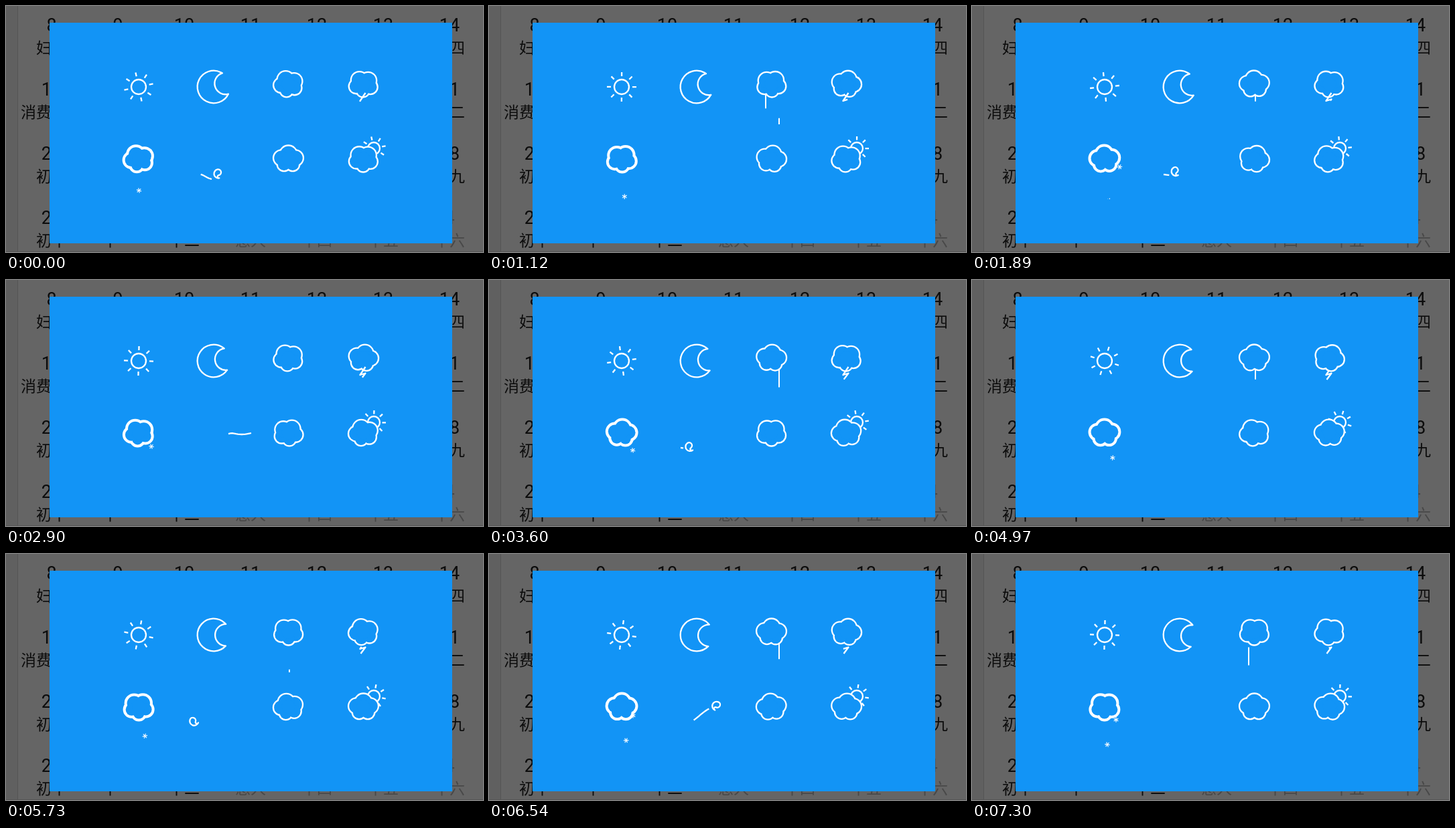
Animation, 712 px wide and 368 px high, one loop 7.35 s. Source, as an HTML page with a canvas:

```html
<!DOCTYPE html>
<html lang="zh">
<head>
<meta charset="utf-8">
<style>
html, body { margin: 0; width: 100%; height: 100%; overflow: hidden; background: #656565; }
canvas { display: block; }
</style>
</head>
<body>
<canvas id="stage" width="712" height="368"></canvas>
<script>
const ctx = document.getElementById('stage').getContext('2d');
const LOOP = 7350, TAU = Math.PI * 2, BLUE = '#1294f6', WHITE = '#fff', STROKE = 2.3;
const clamp = (v, lo = 0, hi = 1) => Math.min(hi, Math.max(lo, v));
const smooth = u => (u = clamp(u), u * u * (3 - 2 * u));
const rad = deg => deg * Math.PI / 180;

function line(points, width = STROKE) {
  ctx.lineWidth = width;
  ctx.beginPath();
  points.forEach(([x, y]) => ctx.lineTo(x, y));
  ctx.stroke();
}

function ring(x, y, r) {
  ctx.lineWidth = STROKE;
  ctx.beginPath();
  ctx.arc(x, y, r, 0, TAU);
  ctx.stroke();
}

function clipBelow(y, draw) {
  ctx.save();
  ctx.beginPath();
  ctx.rect(65, 25, 601, y - 25);
  ctx.clip();
  draw();
  ctx.restore();
}

function calendar() {
  ctx.fillStyle = '#656565';
  ctx.fillRect(0, 0, 712, 368);
  ctx.fillStyle = '#606060';
  ctx.fillRect(0, 0, 17, 368);
  ctx.fillStyle = '#555';
  ctx.fillRect(17, 0, 1, 368);
  ctx.fillRect(0, 367, 712, 1);
  ctx.textAlign = 'center';
  const rows = [
    ['妇女', '', '', '', '', '', '廿四'],
    ['消费者权', '', '', '', '', '', '初二'],
    ['初三', '', '', '', '', '', '初九'],
    ['初十', '十一', '十二', '愚人', '十四', '十五', '十六']
  ];
  rows.forEach((row, r) => row.forEach((label, c) => {
    const x = 68 + 99 * c, y = 96 * r, day = 8 + 7 * r + c;
    ctx.fillStyle = day > 31 ? '#484848' : '#0c0c0c';
    ctx.font = '27px Roboto, sans-serif';
    ctx.fillText(day > 31 ? day - 31 : day, x, y + 38);
    ctx.font = '23px "Noto Sans CJK SC", "Noto Sans CJK", sans-serif';
    ctx.fillText(label, x, y + 70.5);
  }));
  ctx.fillStyle = BLUE;
  ctx.fillRect(65, 25, 601, 330);
}

// Five overlapping puffs circling clockwise; one phase unit is a fifth of a turn.
function cloud(cx, cy, phase, width = STROKE) {
  const grow = (width - 2) / 2;
  const puffs = (color, inset) => {
    ctx.fillStyle = color;
    for (let i = 0; i < 5; i++) {
      const a = Math.PI + TAU * (phase + i) / 5, c = Math.cos(a);
      ctx.beginPath();
      ctx.arc(cx - 11 * Math.sin(a), cy + 8.5 * c + 1.5, 9.5 + 3 * (1 - c / 2) - inset, 0, TAU);
      ctx.fill();
    }
    ctx.beginPath();
    ctx.arc(cx, cy, 10, 0, TAU);
    ctx.fill();
  };
  puffs(WHITE, -grow);
  puffs(BLUE, width - grow);
}

function sun(x, y, r, inner, outer, deg) {
  ring(x, y, r);
  for (let i = 0; i < 8; i++) {
    const a = rad(deg + 45 * i), c = Math.cos(a), s = Math.sin(a);
    line([[x + c * inner, y + s * inner], [x + c * outer, y + s * outer]]);
  }
}

function moon(x, y, deg) {
  ctx.save();
  ctx.translate(x, y);
  ctx.rotate(rad(deg));
  ctx.lineWidth = STROKE;
  ctx.beginPath();
  ctx.arc(0, 0, 24.3, rad(42), rad(318));
  ctx.arc(18.4, 0, 16.3, rad(-91), rad(91), true);
  ctx.closePath();
  ctx.stroke();
  ctx.restore();
}

function rain(t) {
  clipBelow(177, () => {
    for (const [x, start] of [[433, 0.245], [413, 0.865], [423, 1.79]]) {
      const age = (t - start + 2.99) % 2.99;
      if (t < start || age > 1.05) continue;
      const head = 136 + 67 * age;
      line([[x, Math.max(120, head - 27)], [x, head]], 2);
    }
  });
}

// Draws the part of a polyline between two fractions of its length.
function trimmed(points, from, to) {
  const lens = points.slice(1).map((p, i) => Math.hypot(p[0] - points[i][0], p[1] - points[i][1]));
  const total = lens.reduce((a, b) => a + b);
  const part = [];
  let done = 0;
  lens.forEach((len, i) => {
    const a = clamp((from * total - done) / len), b = clamp((to * total - done) / len);
    const [p, q] = [points[i], points[i + 1]];
    if (b > a) for (const u of [a, b]) part.push([p[0] + (q[0] - p[0]) * u, p[1] + (q[1] - p[1]) * u]);
    done += len;
  });
  line(part);
}

function flake(x, y, angle) {
  for (let i = 0; i < 3; i++) {
    const a = angle + i * Math.PI / 3, c = 3.8 * Math.cos(a), s = 3.8 * Math.sin(a);
    line([[x - c, y - s], [x + c, y + s]], 1.3);
  }
}

function snow(t) {
  clipBelow(289, () => {
    ctx.globalAlpha = 0.9;
    flake(198.5 + 3.4 * t, 276 + 8.1 * t, 0.3 + 0.2 * t);
    if (t > 1.5) flake(217 - 3.4 * (t - 2.9), 249 + 8.2 * (t - 2.9), 0.5 + 0.24 * t);
    if (t > 6) flake(215, 248 + 8.2 * (t - 7.3), Math.PI / 2);
    ctx.globalAlpha = 1;
  });
}

function leaf(x, y, d) {
  const a = 6.6, b = a / 3, c = 2 * b, e = Math.cos(d), f = Math.sin(d);
  ctx.lineWidth = STROKE;
  ctx.beginPath();
  ctx.arc(x, y, a, d, d + Math.PI);
  ctx.arc(x - b * e, y - b * f, c, d + Math.PI, d + TAU);
  ctx.arc(x + c * e, y + c * f, b, d + Math.PI, d, true);
  ctx.closePath();
  ctx.stroke();
}

const lowGust = x => x < 309
  ? 255 - 4 * Math.cos(Math.PI * clamp((x - 286) / 23))
  : 259 - 5 * ((x - 309) / 27) ** 1.3;
const highGust = x => 252 + clamp((x - 286) / 8)
  - 23 * smooth((x - 294) / 41) + 2 * Math.sin(Math.PI * clamp((x - 338) / 28)) - clamp((x - 330) / 8);

function wind(t) {
  [0, 2.07, 3.84, 6.24].forEach((time, i) => {
    const end = 307 + 71 * (t - time), high = i % 2, path = high ? highGust : lowGust;
    if (end < 262 || end > 400) return;
    const lx = end + 10 + clamp((end - 307) / 15, 0, 2);
    if (lx < 366) leaf(lx, path(lx) - (high ? 2 : 7), rad(36 + (end - 280) * 1.6));
    const from = Math.max(286, end - 10 - 0.3 * (end - 286) + 2 * Math.max(0, end - 366));
    const to = Math.min(end, 366), points = [];
    for (let k = 0; k <= 12; k++) {
      const x = from + (to - from) * k / 12;
      points.push([x, path(x)]);
    }
    if (to > from) line(points);
  });
}

function draw(now) {
  const ms = now % LOOP, t = ms / 1000, u = ms / LOOP;
  ctx.lineCap = 'butt';
  ctx.lineJoin = 'round';
  calendar();
  ctx.strokeStyle = WHITE;

  sun(198, 121, 11, 16, 22, 33 + 376 * u);
  moon(310, 121, -16 + 21 * u);
  rain(t);
  cloud(421.5, 116.5, 0.7 + 4.85 * u);
  cloud(533.5, 116.5, 0.55 + 4.08 * u);
  const bolt = 0.45 + 1.1 * u;
  trimmed([[536.5, 130], [528.5, 142], [536.5, 139.5], [529.5, 149]], clamp(bolt - 1), clamp(bolt));

  snow(t);
  cloud(198, 228.5, 0.7 + 4.85 * u, 4);
  wind(t);
  cloud(421.5, 228.5, u);
  sun(549, 213, 9, 12.5, 18, 33 + 376 * u);
  cloud(533.5, 228.5, 0.52 + 0.61 * u);
}

const origin = performance.now();
function tick() {
  draw(performance.now() - origin);
  requestAnimationFrame(tick);
}
tick();
</script>
</body>
</html>
```
